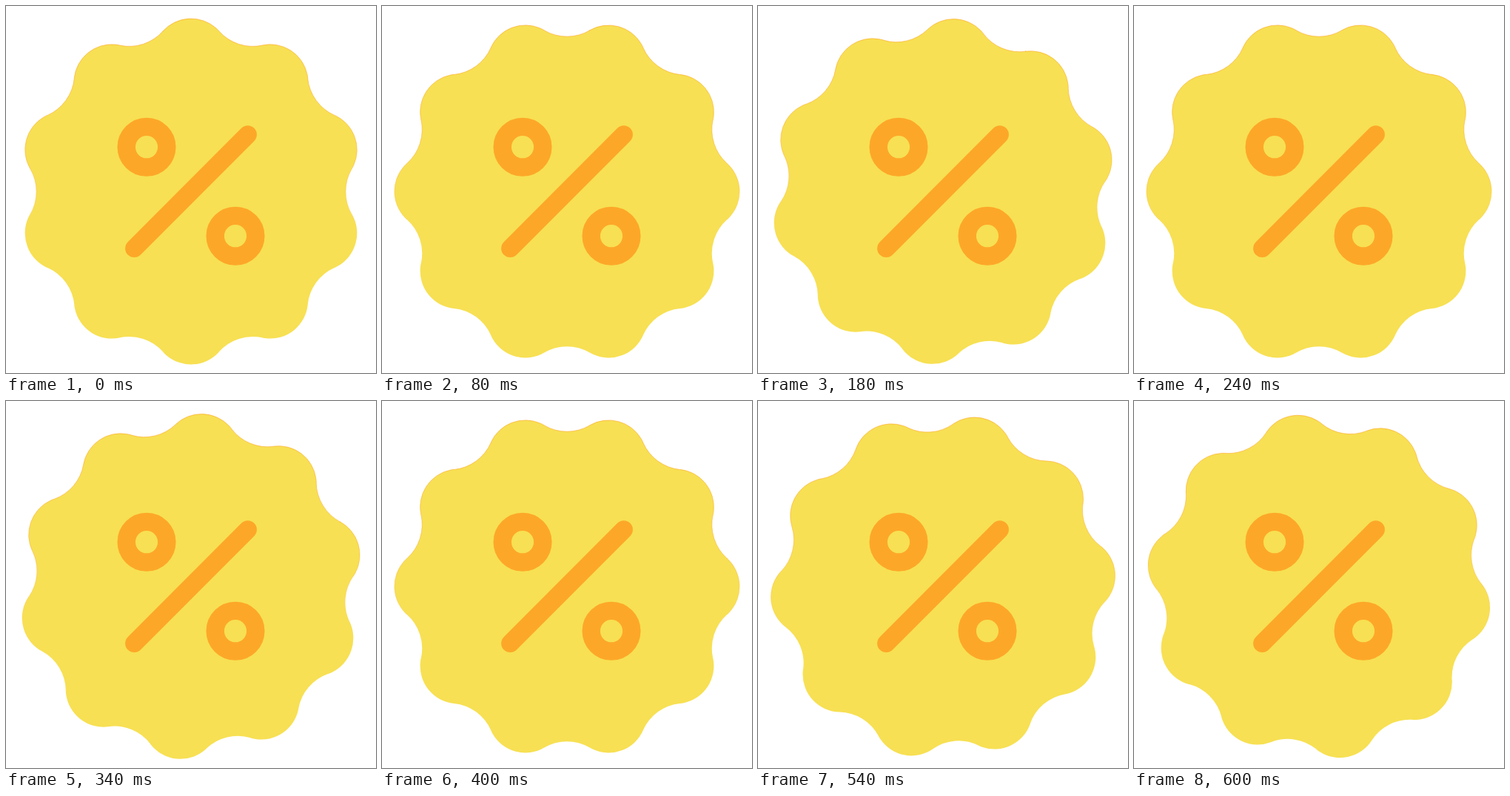
An HTML page with a canvas that plays this animation: 500x495 px, repeating every 640 ms.

```html
<!DOCTYPE html>
<html lang="en">
<head>
<meta charset="utf-8">
<title>Discount badge</title>
<style>
  html, body { margin: 0; width: 100%; height: 100%; overflow: hidden; background: #fff; }
  canvas { display: block; width: 500px; height: 495px; }
</style>
</head>
<body>
<canvas id="stage" width="500" height="495"></canvas>
<script>
const ctx = document.getElementById('stage').getContext('2d');
const YELLOW = '#f7e053', ORANGE = '#fda728';
const LOOP = 640, STEP = 20, LAST = 30, TURN = 4.5;
const CX = 250, CY = 250.2, LOBES = 10;
const rad = deg => deg * Math.PI / 180;

// Round lobes joined by tangent hollows.
const half = Math.PI / LOBES;
const lobe = { dist: 182.2, r: 51 };
const hollow = { dist: 270.3, r: 61.3 };
const lean = Math.atan2(lobe.dist * Math.sin(half), hollow.dist - lobe.dist * Math.cos(half));

// The rim tint stays in place while the badge turns.
const rim = ctx.createLinearGradient(0, 17, 0, 330);
rim.addColorStop(0, 'rgba(253,167,40,.8)');
rim.addColorStop(0.6, 'rgba(253,167,40,.6)');
rim.addColorStop(1, 'rgba(253,167,40,0)');

function arc(c, at, from, to, back) {
  ctx.arc(CX + c.dist * Math.cos(at), CY + c.dist * Math.sin(at), c.r, from, to, back);
}

function badge(turn) {
  ctx.beginPath();
  for (let i = 0; i < LOBES; i++) {
    const a = turn - Math.PI / 2 + i * 2 * half;
    const v = a + half;
    arc(lobe, a, a - half - lean, a + half + lean, false);
    arc(hollow, v, v + Math.PI + lean, v + Math.PI - lean, true);
  }
  ctx.closePath();
  ctx.fillStyle = YELLOW;
  ctx.fill();
  ctx.strokeStyle = rim;
  ctx.lineWidth = 0.8;
  ctx.stroke();
}

function percent() {
  ctx.strokeStyle = ORANGE;
  ctx.lineWidth = 24.4;
  ctx.lineCap = 'round';
  for (const p of [190, 310]) {
    ctx.beginPath();
    ctx.arc(p, p + 0.2, 27.3, 0, 2 * Math.PI);
    ctx.stroke();
  }
  ctx.beginPath();
  ctx.moveTo(326.7, 173.5);
  ctx.lineTo(173.3, 326.9);
  ctx.stroke();
}

function draw() {
  const step = Math.min(Math.floor(performance.now() % LOOP / STEP), LAST);
  ctx.fillStyle = '#fff';
  ctx.fillRect(0, 0, 500, 495);
  badge(rad(step * TURN));
  percent();
  requestAnimationFrame(draw);
}
draw();
</script>
</body>
</html>
```
